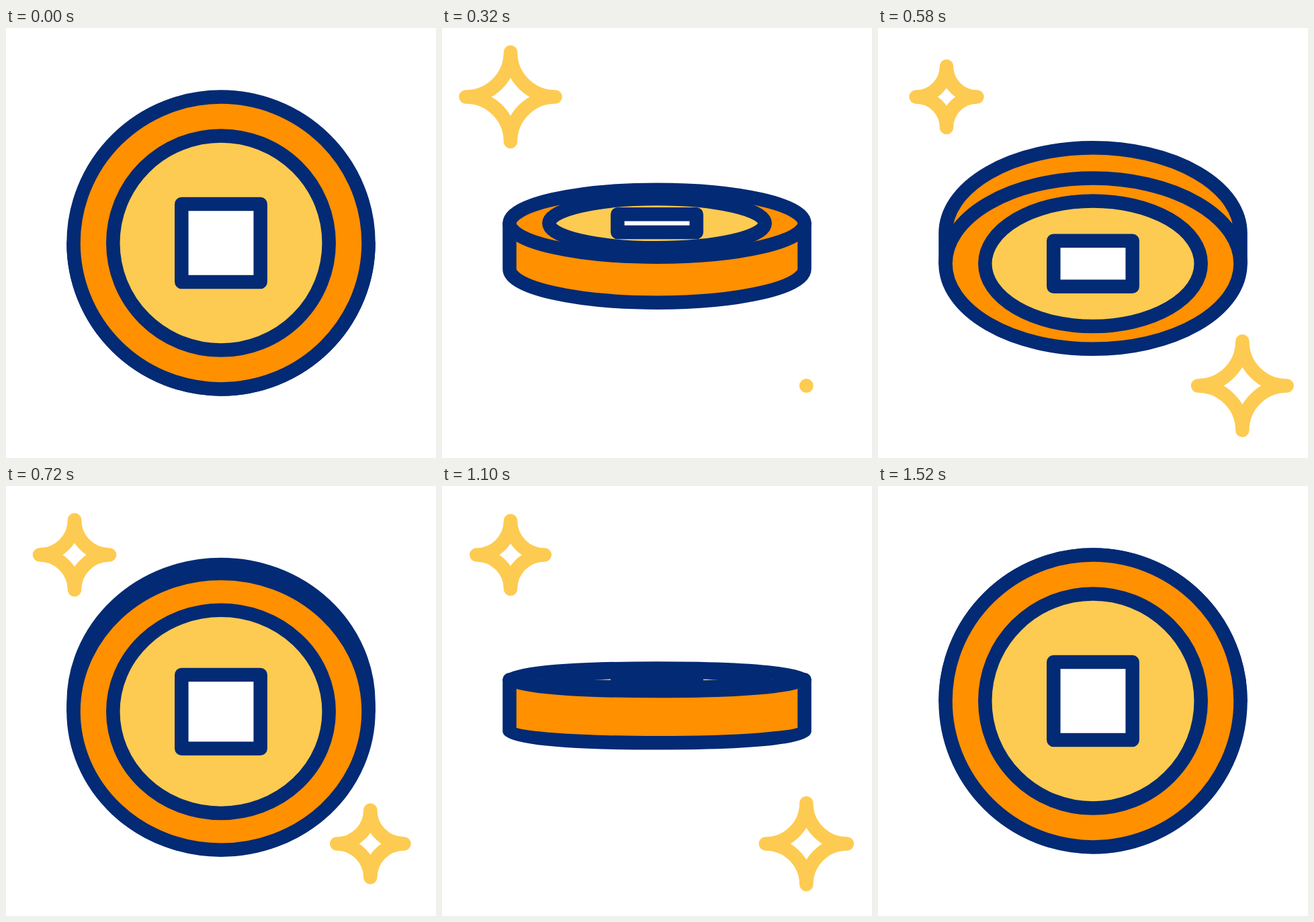
These frames come from a looping animation (640 px wide and 640 px high, 1900 ms). An HTML page:

```html
<!DOCTYPE html>
<html lang="en">
<head>
<meta charset="utf-8">
<title>Flipping coin</title>
<style>
  html, body { margin: 0; width: 100%; height: 100%; overflow: hidden; background: #fff; }
  svg { display: block; width: 100vw; height: 100vh; }
  .navy { stroke: #032a74; }
  .orange { fill: #ff9000; }
  .yellow { fill: #fdcb51; }
  .white { fill: #fff; }
  .star { fill: #fff; stroke: #fdcb51; }
</style>
</head>
<body>
<svg viewBox="0 0 640 640" stroke-width="20.5" stroke-linecap="round" stroke-linejoin="round">
  <path id="body" class="navy orange"/>
  <ellipse id="rim" class="navy orange" cx="320" rx="219.5"/>
  <ellipse id="face" class="navy yellow" cx="320" rx="160.7"/>
  <rect id="hole" class="navy white" x="261.3" width="117.4"/>
  <path id="ledge" class="navy"/>
  <path id="starA" class="star" transform="translate(102 102.5)"/>
  <path id="starB" class="star" transform="translate(542.3 532.5)"/>
</svg>
<script>
const LOOP = 1900, STEP = 20, END = 1520, HALF = 750;
const LEFT = 100.5, RIGHT = 539.5;
const RIM = 217.4, FACE = 159.6, HOLE = 58;

// [time, value]: signed foreshortening of the coin, and its vertical drift
const TILT = [[0, 1], [200, .596], [440, -.166], [720, -.947], [HALF, -1],
              [960, -.584], [1260, .508], [END, 1]];
const DRIFT = [[0, 0], [200, 3.2], [440, 6], [720, 9.3], [960, 8.3], [1260, 4.6], [END, 0]];
const TWINKLE = [[60, 0], [300, 67], [540, 45], [1015, 67], [1280, 0]];
const DELAY = 255;

const $ = id => document.getElementById(id);
const set = (id, attrs) => {
  for (const key in attrs) $(id).setAttribute(key, attrs[key]);
};
const segment = (keys, t) => {
  let i = 0;
  while (i < keys.length - 2 && t >= keys[i + 1][0]) i++;
  return i;
};

// Monotone cubic through the keys
function curve(keys, t) {
  const rise = i => (keys[i + 1][1] - keys[i][1]) / (keys[i + 1][0] - keys[i][0]);
  const slope = i => {
    if (i === 0 || i === keys.length - 1) return 0;
    const a = rise(i - 1), b = rise(i);
    return a * b > 0 ? 2 * a * b / (a + b) : 0;
  };
  const i = segment(keys, t), [t0, a] = keys[i], [t1, b] = keys[i + 1];
  const w = t1 - t0, u = Math.min(1, (t - t0) / w), v = 1 - u;
  return v * v * (1 + 2 * u) * a + u * u * (3 - 2 * u) * b
       + w * u * v * (v * slope(i) - u * slope(i + 1));
}

// Ease in and out between keys
function eased(keys, t) {
  const i = segment(keys, t), [t0, a] = keys[i], [t1, b] = keys[i + 1];
  const u = (t - t0) / (t1 - t0);
  return a + (b - a) * u * u * (3 - 2 * u);
}

function drawCoin(t) {
  const tilt = curve(TILT, t);
  const k = Math.max(.001, Math.min(1, Math.abs(tilt)));
  const depth = 82 * Math.pow(Math.acos(k) / (Math.PI / 2), 1.17);
  const faceUp = (tilt > 0) === (t < HALF);
  const mid = 320 + curve(DRIFT, t);
  const shift = faceUp ? depth / 2 : -depth / 2;
  const front = mid - shift, back = mid + shift;
  const top = front - HOLE * k, bottom = front + HOLE * k;

  set('body', { d: `M${LEFT} ${front}V${back}A219.5 ${RIM * k} 0 0 ${faceUp ? 0 : 1} ${RIGHT} ${back}V${front}` });
  set('rim', { cy: front, ry: RIM * k });
  set('face', { cy: front, ry: FACE * k });
  set('hole', { y: top, height: bottom - top });

  const ledge = Math.min(bottom, top + depth * .9);
  set('ledge', {
    d: `M261.3 ${ledge}H378.7`,
    visibility: faceUp && t >= HALF && t < END ? 'visible' : 'hidden'
  });
}

function drawStar(id, t, now) {
  const on = now < END && t > TWINKLE[0][0] && t < TWINKLE[4][0];
  set(id, { visibility: on ? 'visible' : 'hidden' });
  if (!on) return;
  const s = Math.max(.2, eased(TWINKLE, t)), arc = `A${s} ${s} 0 0 0 `;
  set(id, { d: `M0 ${-s}${arc}${s} 0${arc}0 ${s}${arc}${-s} 0${arc}0 ${-s}Z` });
}

function draw(time) {
  const t = Math.floor((time % LOOP) / STEP) * STEP;
  drawCoin(Math.min(t, END));
  drawStar('starA', t, t);
  drawStar('starB', t - DELAY, t);
}

let start;
function tick(now) {
  if (start === undefined) start = now;
  draw(Math.max(0, now - start));
  requestAnimationFrame(tick);
}
draw(0);
requestAnimationFrame(tick);
</script>
</body>
</html>
```
